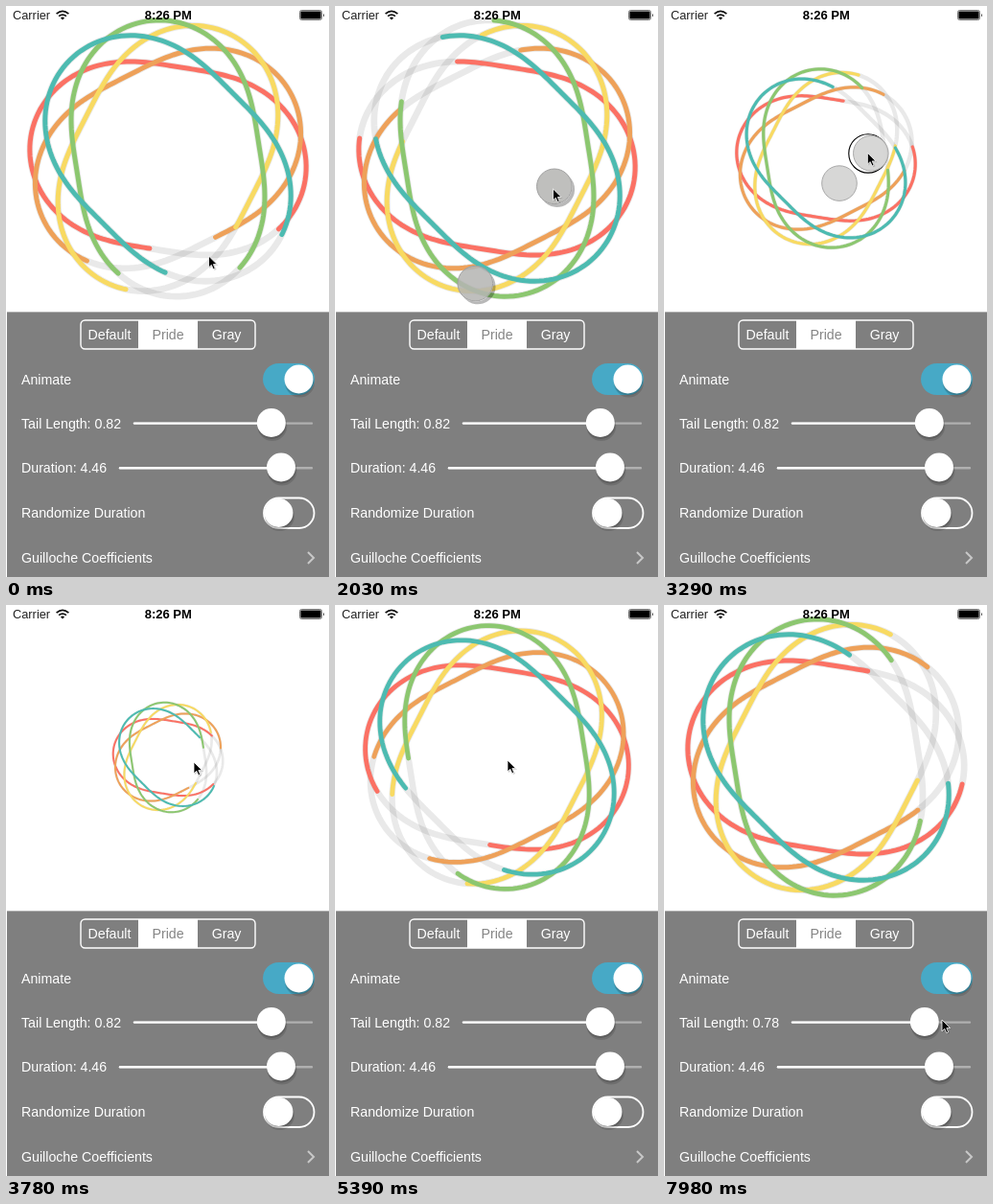
An HTML page that plays this animation: 337 px wide and 596 px high, repeating every 8 s.

```html
<!DOCTYPE html>
<html lang="en">
<head>
<meta charset="utf-8">
<title>Guilloche spinner</title>
<style>
  html, body { margin: 0; width: 100%; height: 100%; overflow: hidden; background: #fff; }
  svg { display: block; width: 100vw; height: 100vh; }
  text { font: 14.2px "Liberation Sans", Arial, sans-serif; fill: #fff; }
  .status text { font-size: 12.8px; fill: #222; }
  .status .clock { font-size: 13px; font-weight: bold; fill: #000; }
  .mid { text-anchor: middle; }
  .line { fill: none; stroke: #fff; }
</style>
</head>
<body>
<svg viewBox="0 0 337 596">
  <defs>
    <g id="knob">
      <circle cx="1" cy="3.5" r="15.5" fill="#000" opacity=".13"/>
      <circle cx=".5" cy="2" r="15" fill="#000" opacity=".14"/>
      <circle r="15" fill="#fff"/>
    </g>
  </defs>

  <g id="ring"></g>

  <g class="status">
    <text x="7" y="14">Carrier</text>
    <g fill="none" stroke="#111" stroke-width="1.7">
      <path d="M52.6 8.2Q59 2.6 65.4 8.2M55.1 10.7Q59 7.4 62.9 10.7"/>
      <path d="M59 14.6L56.9 12.4Q59 10.8 61.1 12.4Z" fill="#111" stroke="none"/>
    </g>
    <text class="clock mid" x="169.3" y="14">8:26 PM</text>
    <rect x="306.5" y="4.5" width="23" height="10" rx="2" fill="none" stroke="#555" stroke-width=".8"/>
    <rect x="307.4" y="5.4" width="21.2" height="8.2" rx="1"/>
    <path d="M331 7.5Q332.6 9.5 331 11.5Z" fill="#222"/>
  </g>

  <rect x="1" y="319.4" width="336" height="277" fill="#7f7f7f"/>

  <rect class="line" x="78" y="328" width="182" height="30" rx="4.5" stroke-width="1.4"/>
  <rect x="138" y="328" width="62" height="30" fill="#fff"/>
  <text class="mid" x="108" y="348">Default</text>
  <text class="mid" x="169" y="348" style="fill:#858585">Pride</text>
  <text class="mid" x="230" y="348">Gray</text>

  <text x="16" y="394.5">Animate</text>
  <text x="16" y="441" id="tailText"></text>
  <text x="16" y="487">Duration: 4.46</text>
  <text x="16" y="534">Randomize Duration</text>
  <text x="16" y="580.5">Guilloche Coefficients</text>

  <rect x="268" y="373" width="54" height="33" rx="16.5" fill="#47a9c6"/>
  <use href="#knob" x="305.5" y="389.5"/>
  <rect class="line" x="269" y="513.5" width="52.5" height="31.5" rx="15.7" stroke-width="1.8"/>
  <use href="#knob" x="284.5" y="529"/>

  <g stroke-width="2.4" stroke-linecap="round">
    <path d="M134 435.6H319M119 482.2H319" stroke="#b0b0b0"/>
    <path d="M119 482.2H287" stroke="#fff"/>
    <path id="tailTrack" stroke="#fff"/>
  </g>
  <use href="#knob" x="287" y="481.5"/>
  <use href="#knob" y="435" id="tailKnob"/>
  <path class="line" d="M315 570L321 576L315 582" style="stroke:#c8c8c8" stroke-width="2"/>

  <g id="touches"></g>
  <circle id="press" r="20.2" fill="#fff" stroke="#000" stroke-width="1.1"/>
  <g id="touchTop"></g>
  <g id="cursor">
    <g transform="scale(.88)">
      <path d="M1 1.5V15L4.4 12L6.8 17L9.2 16L7 11.2H11.4Z" opacity=".18"/>
      <path d="M0 0V13.5L3.2 10.6L5.4 15.5L7.6 14.6L5.5 9.8H9.8Z" stroke="#fff" stroke-width=".9"/>
    </g>
  </g>
</svg>
<script>
const LOOP = 8000, STEP = 70;
const CX = 169, CY = 159, SMALL = 0.41;
const RADIUS = 120.4, WAVE = 24.5;

// tilt of each lobe and its lead along the path, in degrees
const strands = [
  { color: '#fb7164', tilt: 9, lead: -8.5 },
  { color: '#eea159', tilt: -27, lead: 15.3 },
  { color: '#f8da62', tilt: -63, lead: -3 },
  { color: '#8cc770', tilt: -99, lead: 8.5 },
  { color: '#4dbbb1', tilt: -135, lead: -12.5 },
];

// keyframes: [time, value, value, ...]
const spin = [[0, 77], [1190, 168.7], [2940, 294.5], [3780, 370], [4900, 459.5], [6370, 570.7], [8000, 702]];
const pointer = [[0, 211.5, 261], [1190, 213, 257], [1400, 213, 257], [2600, 240, 134], [2980, 240, 134],
  [3500, 197, 164], [3780, 196, 164], [4900, 180, 162], [5400, 180, 162], [6230, 281, 428],
  [6800, 281, 428], [7400, 276, 430], [7560, 277, 430], [7910, 290, 433]];
const finger = [[0, 213, 252], [1400, 213, 252], [2600, 242.5, 133.5], [2980, 242.5, 133.5], [3500, 201, 165]];
const mirror = [[0, 135, 388], [1400, 135, 388], [2600, 156, 205], [2980, 156, 205], [3500, 198, 174]];
const tail = [[0, 0.82], [6800, 0.82], [7400, 0.78]];

const $ = id => document.getElementById(id);
const within = (t, a, b) => t >= a && t < b;
const ease = u => u * u * (3 - 2 * u);

function at(keys, t, curve = u => u) {
  const i = keys.findIndex(k => k[0] > t);
  if (i < 0) return keys[keys.length - 1].slice(1);
  const [a, b] = [keys[i - 1], keys[i]];
  const u = curve((t - a[0]) / (b[0] - a[0]));
  return a.slice(1).map((v, j) => v + (b[j + 1] - v) * u);
}

function add(parent, tag, attrs) {
  const el = document.createElementNS('http://www.w3.org/2000/svg', tag);
  for (const k in attrs) el.setAttribute(k, attrs[k]);
  return parent.appendChild(el);
}

const move = (el, [x, y]) => el.setAttribute('transform', `translate(${x} ${y})`);
const show = (el, on) => el.setAttribute('display', on ? 'inline' : 'none');

function lobePath() {
  const pts = [];
  for (let d = 0; d < 360; d += 2) {
    const a = d * Math.PI / 180, r = RADIUS + WAVE * Math.cos(2 * a);
    pts.push((r * Math.cos(a)).toFixed(2) + ' ' + (r * Math.sin(a)).toFixed(2));
  }
  return 'M' + pts.join('L') + 'Z';
}

const d = lobePath();
const strand = (s, attrs) => add($('ring'), 'path',
  { d, fill: 'none', transform: `rotate(${s.tilt})`, ...attrs });
strands.forEach(s => strand(s, { stroke: '#000', 'stroke-opacity': 0.085, 'stroke-width': 6.8 }));
strands.forEach(s => s.el = strand(s,
  { stroke: s.color, 'stroke-width': 5, 'stroke-linecap': 'round', pathLength: 360 }));

function makeTouch(parent) {
  const g = add(parent, 'g', {});
  const shade = add(g, 'path', {
    d: 'M2.3-18.4A18.5 18.5 0 1 1 2.3 18.4A18.5 18.5 0 0 0 2.3-18.4',
    transform: 'rotate(49)', opacity: 0.28,
  });
  const disc = add(g, 'circle', { r: 18.3, 'stroke-width': 1 });
  return { g, shade, disc };
}
const touches = [[makeTouch($('touchTop')), finger], [makeTouch($('touches')), mirror]];

// damped spring from 0 to 1 with a slight overshoot
function spring(ms) {
  if (ms <= 0) return 0;
  const x = 6.3 * ms / 1000;
  return 1 - Math.exp(-0.95 * x) * (Math.cos(x) + 0.95 * Math.sin(x));
}

function draw(t) {
  const scale = 1 - (1 - SMALL) * (spring(t - 3100) - spring(t - 5080));
  $('ring').setAttribute('transform', `translate(${CX} ${CY}) scale(${scale})`);

  const [len] = at(tail, t), [gap] = at(spin, t);
  const on = 360 * len, off = 360 - on;
  for (const s of strands) {
    const start = (gap + s.lead - s.tilt + off / 2 + 720) % 360;
    s.el.setAttribute('stroke-dasharray', `${on} ${off}`);
    s.el.setAttribute('stroke-dashoffset', 360 - start);
  }

  const knobX = 276.8 + (len - 0.82) * 125;
  $('tailText').textContent = 'Tail Length: ' + len.toFixed(2);
  $('tailKnob').setAttribute('x', knobX);
  $('tailTrack').setAttribute('d', `M134 435.6H${knobX}`);

  const pressed = within(t, 2860, 3500);
  for (const [touch, keys] of touches) {
    show(touch.g, within(t, 800, 3570));
    move(touch.g, at(keys, t, ease));
    show(touch.shade, !pressed);
    touch.disc.setAttribute('fill', pressed ? '#d5d5d4' : '#b5b5b3');
    touch.disc.setAttribute('fill-opacity', pressed ? 0.95 : 0.86);
    touch.disc.setAttribute('stroke', pressed ? '#a9a9a9' : '#a0a0a0');
  }

  const [x, y] = at(pointer, t, ease);
  move($('cursor'), [x, y]);
  move($('press'), [x + 0.6, y + 0.7]);
  show($('press'), pressed || within(t, 6800, 7490));
  $('press').setAttribute('fill-opacity', pressed ? 0.6 : 0);
}

const begin = performance.now();
function tick() {
  const t = (performance.now() - begin) % LOOP;
  draw(Math.floor(t / STEP) * STEP);
  requestAnimationFrame(tick);
}
tick();
</script>
</body>
</html>
```
